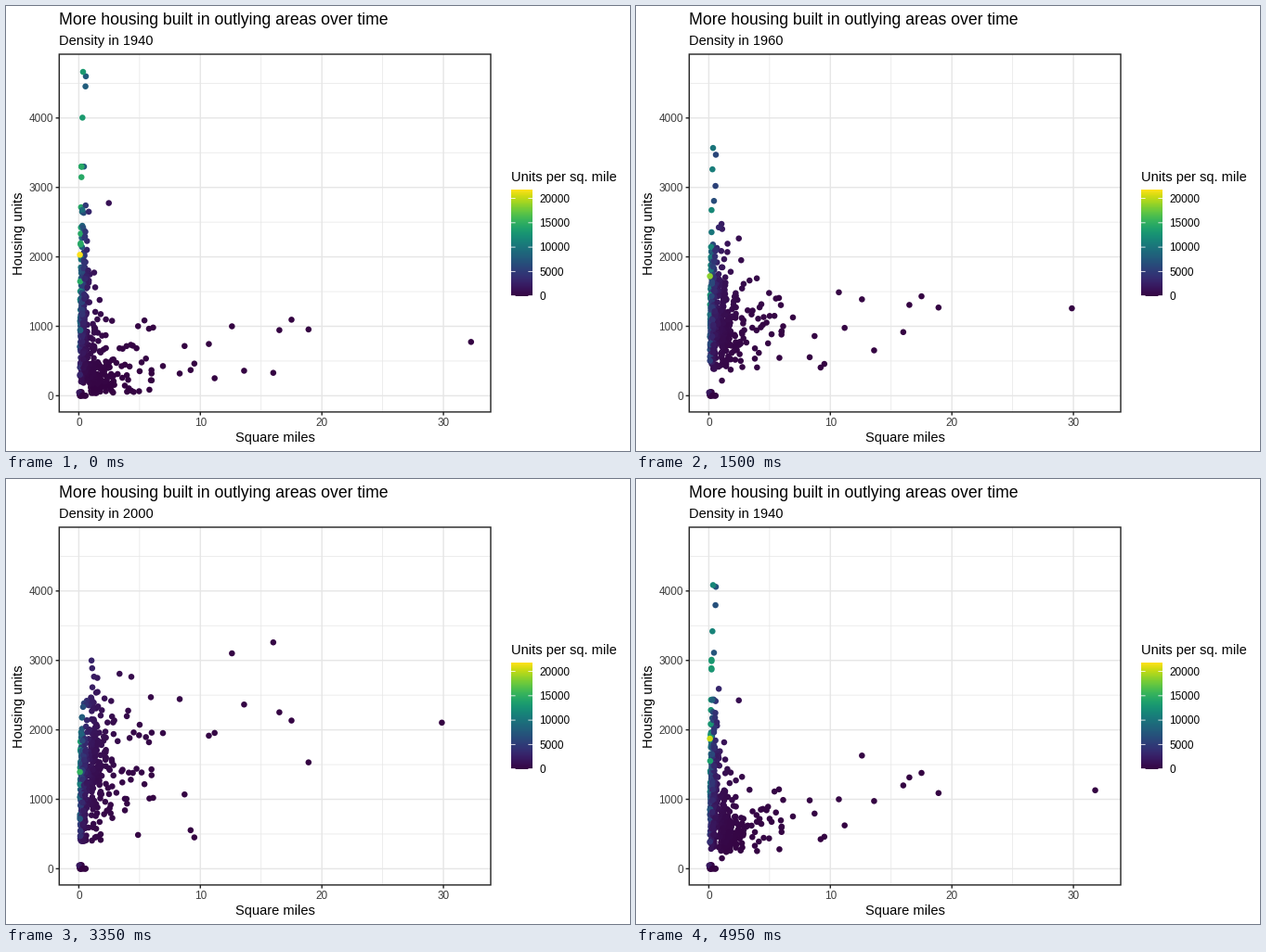
A matplotlib script that plays this animation: 672 by 480 pixels, repeating every 5 s.

```python
import numpy as np
import matplotlib.pyplot as plt
from matplotlib.animation import FuncAnimation
from matplotlib.colors import ListedColormap, to_rgb
from matplotlib.patches import Rectangle

W, H, DPI = 672, 480, 96
FRAMES, INTERVAL = 100, 50
YEARS = [*range(1940, 2011, 10), 2019]
STATES = len(YEARS)
MOVES = [6, 6] + [5] * 7  # frames in motion after each state
REST = 6

LEFT, RIGHT, TOP, BOTTOM = 57.3, 522, 52, 437.9
BAR = (544, 567, 198, 313)
MAX_DENSITY = 21900

plt.rcParams["font.family"] = "Liberation Sans"


def deepen(rgb):
    """Re-encode sRGB values with a plain 1.8 gamma."""
    rgb = np.asarray(rgb)
    linear = np.where(rgb > 0.04, ((rgb + 0.055) / 1.055) ** 2.4, rgb / 12.92)
    return linear ** (1 / 1.8)


GRID, DARK, GREY = (deepen(to_rgb(c)) for c in ("#EBEBEB", "#333333", "#4D4D4D"))
VIRIDIS = ListedColormap(deepen(plt.get_cmap("viridis")(np.linspace(0, 1, 256))[:, :3]))


def px(miles):
    return 78.4 + 13.09 * miles


def py(units):
    return 420.4 - 0.0749 * units


# Landmark tracts: square miles, then units in 1940, 1970 and 2019
LANDMARKS = [
    (29.87, 775, 1435, 2550),
    (18.9, 955, 1385, 1630),
    (17.5, 1095, 1555, 2520),
    (16.5, 945, 1440, 2795),
    (16.0, 330, 1130, 4680),
    (13.6, 360, 760, 3435),
    (12.6, 1000, 1530, 4150),
    (10.7, 745, 1760, 2020),
    (9.2, 370, 420, 645),
    (8.3, 320, 640, 3645),
    (2.47, 2775, 2080, 1025),
    (0.58, 4600, 3060, 1900),
    (0.55, 4455, 2500, 1160),
    (0.35, 4664, 3170, 1770),
    (0.30, 4005, 2990, 1080),
    (0.092, 2030, 1610, 1250),
]


def random_tracts(rng):
    """Suburbs that fill up, a dense core that thins out, and empty tracts."""
    suburbs, core, empty = 190, 300, 16

    xs = (1 - 0.97 * rng.random(suburbs)) ** (-1 / 1.4)
    old_s = np.clip(rng.lognormal(np.log(200 * xs ** 0.3), 0.75), 40, 1100)
    new_s = np.clip(rng.normal(1600, 620, suburbs), 450, 3000)

    xc = np.clip(rng.lognormal(np.log(0.37), 0.65, core), 0.1, 1.8)
    old_c = np.minimum(rng.gamma(2.6, 440, core) * np.exp(-xc / 3) + 60, 3300)
    mean_c = 700 + 700 * np.minimum(xc, 1.2) + 0.2 * old_c
    new_c = np.clip(rng.normal(mean_c, 470), 400, 2900)

    x = np.concatenate([xs, xc])[:, None]
    old = np.concatenate([old_s, old_c])[:, None]
    new = np.concatenate([new_s, new_c])[:, None]
    pace = rng.uniform(1.4, 4, x.shape)
    y = old + (new - old) * (1 - np.exp(-(np.arange(STATES) / pace) ** 1.5))
    x = np.maximum(x, y.max(axis=1, keepdims=True) / 14500)

    x0 = rng.uniform(0.02, 0.6, (empty, 1))
    y0 = np.repeat(60 * rng.random((empty, 1)) ** 3, STATES, axis=1)
    return np.vstack([x, x0]), np.vstack([y, y0])


areas, random_units = random_tracts(np.random.default_rng(12))
marks = np.array(LANDMARKS)
mark_units = [np.interp(range(STATES), [0, 3, 8], row[1:]) for row in marks]
miles = np.repeat(np.vstack([areas, marks[:, :1]]), STATES, axis=1)
miles[miles[:, 0].argmax(), 0] = 32.27  # the largest tract is cut after 1940
units = np.vstack([random_units, mark_units])
density = units / miles

fig = plt.figure(figsize=(W / DPI, H / DPI), dpi=DPI, facecolor="white")
ax = fig.add_axes([0, 0, 1, 1])
ax.axis("off")


def line(xs, ys, color, width, z):
    ax.plot(xs, ys, color=color, lw=width, zorder=z, snap=False,
            solid_capstyle="butt")


def label(x, y, text, size, color="black", **kw):
    return ax.text(x, y, text, fontsize=size, color=color, va="baseline", **kw)


def draw_panel():
    for v in range(5, 30, 10):
        line([px(v)] * 2, [TOP, BOTTOM], GRID, 0.53, 1)
    for v in range(500, 5000, 1000):
        line([LEFT, RIGHT], [py(v)] * 2, GRID, 0.53, 1)
    for v in range(0, 40, 10):
        line([px(v)] * 2, [TOP, BOTTOM], GRID, 1.07, 1)
        line([px(v)] * 2, [BOTTOM, BOTTOM + 3.7], DARK, 1.07, 1)
        label(px(v), 453, str(v), 8.8, GREY, ha="center")
    for v in range(0, 5000, 1000):
        line([LEFT, RIGHT], [py(v)] * 2, GRID, 1.07, 1)
        line([LEFT - 3.7, LEFT], [py(v)] * 2, DARK, 1.07, 1)
        label(50.7, py(v) + 4.2, str(v), 8.8, GREY, ha="right")
    ax.add_patch(Rectangle((LEFT, TOP), RIGHT - LEFT, BOTTOM - TOP, fill=False,
                           ec=DARK, lw=1.07, zorder=4, snap=False))
    label((LEFT + RIGHT) / 2, 469.7, "Square miles", 11, ha="center")
    label(17.9, (TOP + BOTTOM) / 2, "Housing units", 11, ha="center",
          rotation=90, rotation_mode="anchor")
    label(LEFT, 20, "More housing built in outlying areas over time", 13.2)


def draw_legend():
    x0, x1, y0, y1 = BAR
    ax.imshow(np.linspace(1, 0, 256)[:, None], cmap=VIRIDIS, aspect="auto",
              extent=(x0, x1, y1, y0), interpolation="bilinear")
    label(x0, 189, "Units per sq. mile", 11)
    for v in range(0, 25000, 5000):
        y = y1 - 0.4 - (y1 - y0) * v / MAX_DENSITY
        line([x0, x0 + 4.6], [y, y], "white", 0.6, 3)
        line([x1 - 4.6, x1], [y, y], "white", 0.6, 3)
        label(574.3, y + 4.2, str(v), 8.8)


draw_panel()
draw_legend()
subtitle = label(LEFT, 41.8, "", 11)
dots = ax.scatter(px(miles[:, 0]), py(units[:, 0]), c=density[:, 0], s=24,
                  cmap=VIRIDIS, vmin=0, vmax=MAX_DENSITY, linewidths=0,
                  zorder=3)
ax.set_xlim(0, W)
ax.set_ylim(H, 0)


def position(frame):
    """Place in the cycle of states; whole numbers are rests."""
    start, pos = 0, 0
    for steps in MOVES:
        start += REST
        pos += min(max((frame - start + 1) / steps, 0), 1)
        start += steps
    return pos


def update(frame):
    pos = position(frame)
    a, t = int(pos) % STATES, pos % 1
    b = (a + 1) % STATES

    def mix(values):
        return values[:, a] * (1 - t) + values[:, b] * t

    dots.set_offsets(np.column_stack([px(mix(miles)), py(mix(units))]))
    dots.set_array(mix(density))
    subtitle.set_text(f"Density in {YEARS[int(pos + 0.5) % STATES]}")
    return dots, subtitle


anim = FuncAnimation(fig, update, frames=FRAMES, interval=INTERVAL,
                     repeat=True, repeat_delay=0)
plt.show()
```
